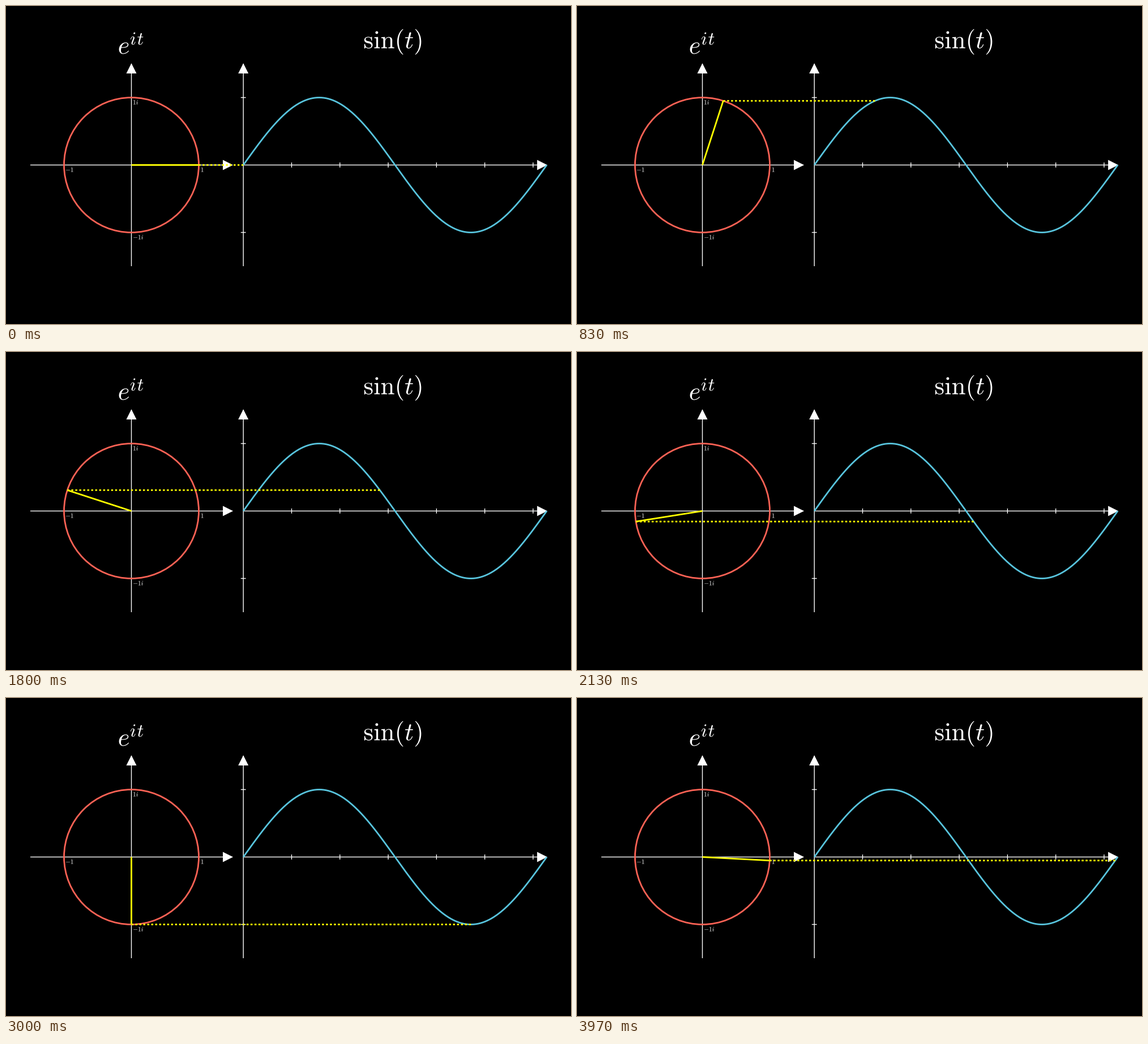
These frames come from a looping animation (998x561 px, 4 s). A matplotlib script:

```python
import numpy as np
import matplotlib as mpl
import matplotlib.pyplot as plt
from matplotlib.animation import FuncAnimation
from matplotlib.patches import Circle, PathPatch, Polygon
from matplotlib.textpath import TextPath
from matplotlib.transforms import Affine2D

mpl.rcParams["mathtext.fontset"] = "cm"

W, H, DPI = 998, 561, 64
FRAMES, LOOP_MS = 120, 4000
RED, BLUE, YELLOW, WHITE = "#FC6255", "#58C4DD", "#FFFF00", "#FFFFFF"

CX, CY, R = 221.5, 280.5, 119.0   # unit circle
X0, UNIT = 419.2, 85.3            # time axis: origin and pixels per radian
THIN, THICK = 1.4, 2.8
DASH = 3.5

fig = plt.figure(figsize=(W / DPI, H / DPI), dpi=DPI, facecolor="black")
ax = fig.add_axes([0, 0, 1, 1])
ax.set_xlim(0, W)
ax.set_ylim(H, 0)
ax.axis("off")


def px(width):
    return width * 72 / DPI


def line(xs, ys, color, width, z):
    artist, = ax.plot(xs, ys, color=color, lw=px(width), zorder=z,
                      solid_capstyle="butt", solid_joinstyle="round")
    artist.set_snap(False)
    return artist


def tip(x, y, dx, dy, length=18, half=9):
    """Arrow head whose point is at (x, y), facing (dx, dy)."""
    bx, by = x - dx * length, y - dy * length
    corners = [(x, y), (bx - dy * half, by + dx * half),
               (bx + dy * half, by - dx * half)]
    ax.add_patch(Polygon(corners, fc=WHITE, ec="none", zorder=2, snap=False))


def axis(x1, y1, x2, y2):
    line([x1, x2], [y1, y2], WHITE, THIN, 1)
    dx, dy = np.sign(x2 - x1), np.sign(y2 - y1)
    tip(x2 + dx, y2 + dy, dx, dy)


def label(tex, x, baseline, size):
    place = Affine2D().scale(1, -1).translate(x, baseline)
    path = place.transform_path(TextPath((0, 0), f"${tex}$", size=size))
    ax.add_patch(PathPatch(path, fc=WHITE, ec="none", zorder=3, snap=False))


def dashes(x1, x2, y):
    """Evenly dashed horizontal line that begins and ends with a dash."""
    span = x2 - x1
    n = max(2, int(np.ceil(span / DASH / 2)))
    on, off = span / 2 / n, span / 2 / (n - 1)
    start = x1 + np.arange(n) * (on + off)
    xs = np.column_stack([start, start + on, np.full(n, np.nan)]).ravel()
    return xs, np.full(xs.size, y)


# Axes and ticks
reach = 1.5 * R
axis(CX - reach, CY, CX + reach, CY)
axis(CX, CY + reach, CX, CY - reach)
axis(X0, CY, X0 + 2 * np.pi * UNIT, CY)
axis(X0, CY + reach, X0, CY - reach)
for k in range(1, 7):
    x = X0 + k * UNIT
    line([x, x], [CY - 4.4, CY + 4.4], WHITE, THIN, 1)
for y in (CY - R, CY + R):
    line([X0 - 4.4, X0 + 4.4], [y, y], WHITE, THIN, 1)

# Labels
label("e", 197.6, 84.5, 45)
label("i", 219.0, 68.3, 32.5)
label("t", 231.6, 68.3, 32.5)
label(r"\mathrm{sin}(t)", 631.4, 74.5, 45)
for tex, x, y in (("-1", 105.1, 292.5), ("1", 343.9, 292.5),
                  ("1i", 224.1, 173.5), ("-1i", 224.3, 411.5)):
    label(tex, x, y, 11.25)

# Curves
ax.add_patch(Circle((CX, CY), R, fill=False, ec=RED, lw=px(THICK), zorder=4))
ts = np.linspace(0, 2 * np.pi, 400)
line(X0 + UNIT * ts, CY - R * np.sin(ts), BLUE, THICK, 5)

radius = line([], [], YELLOW, THICK, 6)
link = line([], [], YELLOW, THICK, 7)


def update(i):
    t = 2 * np.pi * i / FRAMES
    x, y = CX + R * np.cos(t), CY - R * np.sin(t)
    radius.set_data([CX, x], [CY, y])
    link.set_data(*dashes(x, X0 + UNIT * t, y))
    return radius, link


anim = FuncAnimation(fig, update, frames=FRAMES, interval=LOOP_MS / FRAMES,
                     repeat=True, repeat_delay=0)
plt.show()
```
